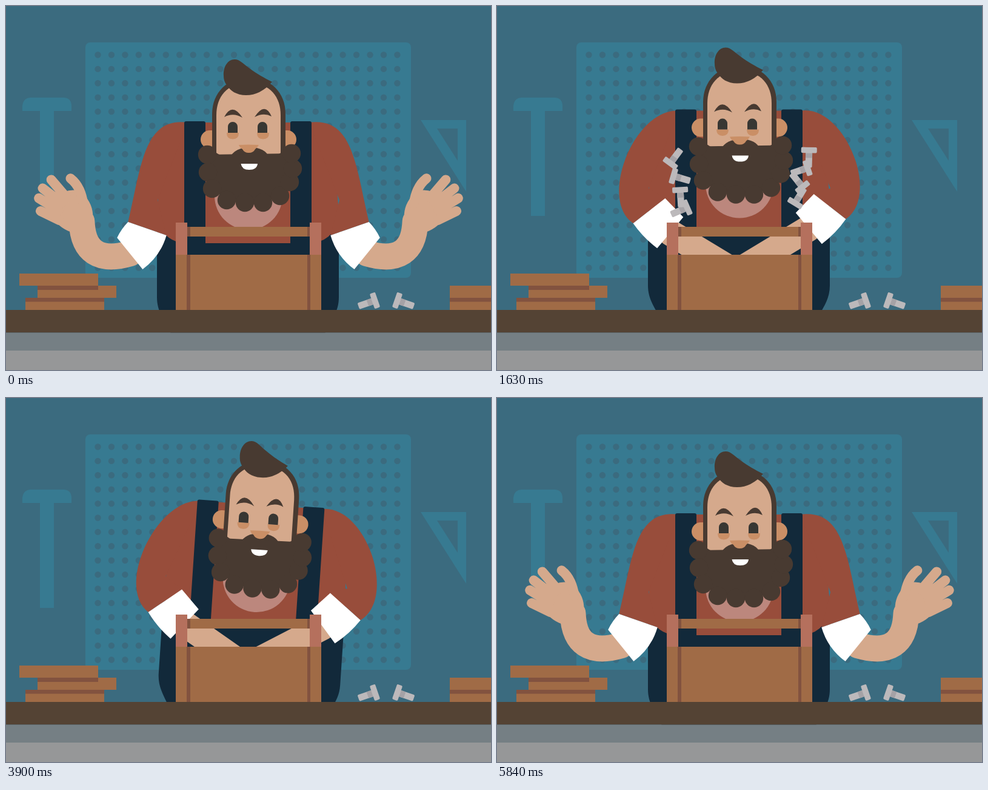
An HTML page that plays this animation: 800x600 px, repeating every 6.47 s.

```html
<!DOCTYPE html>
<html lang="en">
<head>
<meta charset="utf-8">
<title>Toolbox</title>
<style>
html, body { margin: 0; width: 100%; height: 100%; overflow: hidden; background: #3b6b7f; }
svg { display: block; width: 100vw; height: 100vh; }
.board { fill: #377a91; } .wood { fill: #a06b46; } .dark { fill: #82523f; } .post { fill: #b5705d; }
.shirt { fill: #984d3b; } .navy { fill: #12293a; } .hair { fill: #483a31; }
.skin { fill: #d5a98c; } .tan { fill: #ca8f66; } .eye { fill: #383733; }
.limb { fill: none; stroke: #d5a98c; stroke-linecap: round; }
.curls { marker: url(#curl); }
</style>
</head>
<body>
<svg viewBox="0 0 800 600">
  <defs>
    <marker id="curl" markerUnits="userSpaceOnUse" markerWidth="32" markerHeight="32" refX="16" refY="16">
      <circle class="hair" cx="16" cy="16" r="15.200"/>
    </marker>
    <g id="screw">
      <rect x="-24" y="-5.500" width="25" height="11" rx="2" fill="#bcb9bb"/>
      <rect x="-8" y="-5.500" width="8" height="11" fill="#a5a2a6"/>
      <rect y="-13" width="9.500" height="26" rx="2" fill="#bcb9bb"/>
    </g>
    <g id="driver">
      <path fill="#ccd5d8" d="M110-3H166L178-9 190-8 213-3V3L190 8 178 9 166 3H110Z"/>
      <rect x="86" y="-13" width="16" height="26" fill="#9c3f48"/>
      <path fill="#c24f55" d="M8-17Q50-20 88-12V12Q50 20 8 17Q0 16 0 8V-8Q0-16 8-17Z"/>
      <rect x="98" y="-18" width="16" height="36" rx="3" fill="#c24f55"/>
    </g>
    <g id="palm">
      <path class="skin" d="M-31-50Q-34-10-22 4L21 5Q36-12 33-38Q20-58 0-56Z"/>
      <path class="limb" stroke-width="16" d="M-36-60L-25-28M-23-77L-14-40M-7-84L-2-45M13-84L10-45M37-63C39-46 32-32 22-18"/>
    </g>
    <g id="fist">
      <path class="skin" d="M-21 0L-18-25 18-62 42-56 64-30Q62 0 24 4L20 10Z"/>
      <path class="limb" stroke-width="17" d="M-19-27L20-25M-8-39L25-30M3-51L30-35M17-63L35-45"/>
      <use href="#driver" transform="translate(-6 12) rotate(-50.7)"/>
      <path class="limb" stroke-width="18" d="M54-34Q63-18 44-5"/>
    </g>
  </defs>

  <rect width="800" height="600" fill="#3b6b7f"/>
  <rect class="board" x="131" y="60" width="537" height="388" rx="8"/>
  <g id="pegs" stroke="#3b6b7f" stroke-width="10.400" stroke-linecap="round" stroke-dasharray="0 22.45"></g>
  <path class="board" d="M27 173V165Q28 152 40 151H96Q108 152 108 165V173H79V346H56V173Z"/>
  <path class="board" fill-rule="evenodd" d="M684 188H759V306ZM711 202H745V255Z"/>

  <g id="body">
    <path class="navy" d="M249 330H549V480C549 505 536 518 526 540H272C262 518 249 505 249 480Z"/>
    <path class="shirt" d="M249 338L258 235Q266 192 300 192H498Q532 192 540 235L549 338Q547 385 505 391H293Q251 385 249 338Z"/>
    <path id="sleeveL" class="shirt"/>
    <g transform="translate(800) scale(-1 1)"><path id="sleeveR" class="shirt"/></g>
    <circle cx="400" cy="313" r="56" fill="#bc877d"/>
    <rect class="navy" x="294" y="190" width="35" height="206" rx="3"/>
    <rect class="navy" x="469" y="190" width="35" height="206" rx="3"/>
    <g id="head">
      <rect id="earL" class="tan" x="321" y="205" width="36" height="30" rx="15"/>
      <rect id="earR" class="tan" x="443" y="205" width="36" height="30" rx="15"/>
      <path class="hair" d="M340 252V178C340 142 366 118 400 118C436 118 461 142 461 178V252Z"/>
      <path class="skin" d="M347 264V180C347 150 364 127 400 127C436 127 453 150 453 180V264Z"/>
      <path class="hair" d="M359 115C358 100 366 88 377 88C386 88 392 96 402 103C414 112 425 118 439 125Q420 147 396 147C380 147 369 139 366 132C361 128 359 121 359 115Z"/>
      <g id="eyes">
        <path class="tan" d="M364 209H384Q384 219.500 374 219.500Q364 219.500 364 209ZM414 209H434Q434 219.500 424 219.500Q414 219.500 414 209Z"/>
        <path class="eye" d="M366 209V199A8 8 0 0 1 382 199V209ZM415 209V199A8 8 0 0 1 431 199V209Z"/>
      </g>
      <path id="brows" class="hair" d="M360 183Q373 158 390 184Q375 175 360 183ZM410 183Q427 157 438 182Q425 175 410 183Z"/>
      <g id="beard">
        <path class="hair" d="M332 238L344 240Q356 249 369 250Q378 233 402 233Q428 233 434 250Q446 247 455 241L470 238V290H333Z"/>
        <path class="hair curls" d="M332 245L333 274 340 301 364 320 394 324 424 324 452 313 468 290 473 268 471 243"/>
        <path fill="#fff" d="M387.500 260H415Q414 270 401 270Q389 270 387.500 260Z"/>
      </g>
      <path id="nose" class="tan" d="M384 229Q400 228 417 229Q414 234 411 236Q408 242 400.500 242Q393 242 390 236Q386 234 384 229Z"/>
    </g>
    <g id="armL"></g>
    <g transform="translate(800) scale(-1 1)"><g id="armR"></g></g>
  </g>

  <g id="bits"></g>
  <use id="thrown" href="#driver"/>

  <rect class="wood" x="299" y="364" width="202" height="16"/>
  <path class="dark" d="M299 364h5v16h-5ZM497 364h4v16h-4Z"/>
  <path class="post" d="M280 357h19v54h-19ZM501 357h19v54h-19Z"/>
  <rect class="wood" x="280" y="410" width="240" height="92"/>
  <path class="dark" d="M298 410h6v92h-6ZM497 410h5v92h-5Z"/>

  <path class="wood" d="M22 441h130v20h-130ZM52 461h130v20h-130ZM32 481h130v21h-130ZM732 461h68v41h-68Z"/>
  <path class="dark" d="M52 461h100v7h-100ZM32 481h130v6.500h-130ZM732 481h68v6.500h-68Z"/>
  <use href="#screw" transform="translate(604 487) rotate(-19)"/>
  <use href="#screw" transform="translate(650 487) rotate(199)"/>
  <rect y="501" width="800" height="37.500" fill="#544334"/>
  <rect y="538.500" width="800" height="30" fill="#757f84"/>
  <rect y="568" width="800" height="32" fill="#969798"/>
</svg>

<script>
const LOOP = 6470, UP = 580, DIVE = 1340, LAND = 1520, PULL = 4300, TOSS = 5370, END = 5840;
const $ = id => document.getElementById(id);
const set = (id, name, value) => $(id).setAttribute(name, value);
const move = (id, x, y) => set(id, 'transform', `translate(${x} ${y})`);
const show = (id, on) => set(id, 'visibility', on ? 'visible' : 'hidden');

const smooth = p => p * p * (3 - 2 * p);
const back = p => 1 + 2.5 * (p - 1) ** 3 + 1.5 * (p - 1) ** 2;
const spring = p => 1 - Math.cos(2.5 * Math.PI * p) * (1 - p);
const wave = (t, period) => Math.sin(2 * Math.PI * t / period);
const arch = (t, from, to) => t > from && t < to ? Math.sin(Math.PI * (t - from) / (to - from)) : 0;

// Mixes numbers, points and objects of them
function mix(a, b, w) {
  if (typeof a === 'number') return a + (b - a) * w;
  const out = Array.isArray(a) ? [] : {};
  for (const k in a) out[k] = mix(a[k], b[k], w);
  return out;
}

// Keyframes: [time, value, ease into this key]
function key(t, keys) {
  const i = keys.findIndex(k => t < k[0]);
  if (i === 0) return keys[0][1];
  if (i < 0) return keys[keys.length - 1][1];
  const a = keys[i - 1], b = keys[i];
  return mix(a[1], b[1], (b[2] || smooth)((t - a[0]) / (b[0] - a[0])));
}

// Left arm; the right one is its mirror image
const out = { bow: [224, 259], cuff: [233, 367], tilt: 19, bend: 32, elbow: [128, 430], wrist: [125, 355], hand: -45 };
const up = { bow: [234, 238], cuff: [208, 357], tilt: 50, bend: 59, elbow: [115, 331], wrist: [127, 241], hand: 0 };
const dig = { bow: [166, 333], cuff: [251, 353], tilt: -38, bend: -12, elbow: [344, 424], wrist: [400, 458], hand: 140 };
const hold = { bow: [215, 278], cuff: [186, 352], tilt: 36, bend: 50, elbow: [86, 381], wrist: [116, 284], hand: -4 };

const START = [[0, out], [UP, up], [DIVE, up], [LAND, dig]];
const LEFT = [...START, [PULL, dig], [4640, hold, back], [TOSS, hold], [5800, out, back]];
const RIGHT = [...START, [TOSS, dig], [5800, out, back]];
const LIFT = [[0, 0], [640, 11, spring], [DIVE, 11], [2000, 16.5, spring], [TOSS, 16.5], [END, 0, spring]];
const LEAN = [[1900, 0], [2300, 3.8], [TOSS, 3.8], [5640, 0]];
const LOOK = [[DIVE, 0], [1600, 1]];
const TURN = [[4340, 0], [4660, 1, back], [TOSS, 1], [5620, 0]];
const NOD = [[0, 0], [500, -2.5], [DIVE, -2.5], [1600, 0]];

// Both ends of a 67 px edge with the given centre and angle
function edge([x, y], deg) {
  const r = deg * Math.PI / 180, u = 33.5 * Math.cos(r), v = 33.5 * Math.sin(r);
  return [[x - u, y - v], [x + u, y + v]];
}
// Control point bulging sideways from the middle of a line
const bulge = ([x, y], [u, v], k) => [(x + u) / 2 + k * (v - y), (y + v) / 2 - k * (u - x)];

function drawArm(side, t, keys, dx, dy, fist) {
  const p = key(t, keys);
  const shift = ([x, y], sway = 0) => [x + dx + sway, y + dy];
  const sway = -25 * arch(t, 0, UP);
  const cuff = shift(p.cuff), elbow = shift(p.elbow, sway), wrist = shift(p.wrist, sway);
  const dir = (p.tilt + p.bend / 2 + 90) * Math.PI / 180;
  const rim = [cuff[0] + 50 * Math.cos(dir), cuff[1] + 50 * Math.sin(dir)];
  const [a, b] = edge(cuff, p.tilt), [d, c] = edge(rim, p.tilt + p.bend);
  const round = Math.max(0, Math.hypot(c[0] - b[0], c[1] - b[1]) - 43) * 0.0067;

  set('sleeve' + side, 'd', `M300 192C${shift([228, 183])} ${shift(p.bow)} ${a}L${b}L250 320Z`);
  set('cuff' + side, 'd', `M${a}L${b}Q${bulge(b, c, round)} ${c}L${d}Q${bulge(d, a, 0.08)} ${a}Z`);
  set('fore' + side, 'd', `M${rim}Q${elbow} ${wrist}`);
  const shake = t > 640 && t < 1280 ? -3 * wave(t - 640, 320) : 0;
  set('hand' + side, 'href', fist ? '#fist' : '#palm');
  set('hand' + side, 'transform', `translate(${wrist}) rotate(${p.hand + shake})`);
}

// Flight from a point under gravity, s in seconds
const fly = (id, x, y, vx, vy, s, turn) =>
  set(id, 'transform', `translate(${x + vx * s} ${y + vy * s + 1200 * s * s}) rotate(${turn})`);

const BITS = 8;
function drawBits(t) {
  const late = t > 4000, s = (t - (late ? 4480 : 1500)) / 1000;
  for (let i = 0; i < BITS; i++) {
    const side = (i % 2 ? 1 : -1) * (late ? -1 : 1);
    show('bit' + i, s > 0 && s < 0.9);
    fly('bit' + i, 400, 400, side * (693 + 26 * i), -661 - 100 * i, s, 140 + 145 * i + 400 * (s - 0.54));
  }
}

function drawThrown(t) {
  const s = (t - 5400) / 1000;
  show('thrown', s >= 0 && s < 0.42);
  fly('thrown', 127, 262, 2300, -900, s, 700 * s - 50.7);
}

function draw(t) {
  const look = key(t, LOOK), turn = key(t, TURN);
  set('body', 'transform', `rotate(${key(t, LEAN)} 399 501) translate(0 ${-key(t, LIFT)})`);
  set('head', 'transform', `translate(0 ${key(t, NOD)}) rotate(${9 * turn} 399 306)`);
  move('eyes', -2 * look * (t < TOSS) - 12 * turn, 14 * look - 8 * turn);
  move('brows', -2 * look * (t < TOSS) - 14 * turn, 11 * look - 8 * turn);
  move('nose', -15 * turn, 6 * look - 5 * turn);
  move('beard', -8 * turn, 6 * look - 7 * turn);
  move('earL', 4 * turn, 0);
  set('earR', 'rx', Math.max(1, 15 - 14 * turn));

  const stir = key(t, [[2200, 0], [2700, 1], [4000, 1], [PULL, 0]]);
  const bob = 5 * stir * (1 + arch(t, 2700, 3900)) * wave(t - 2740, 550);
  const low = end => key(t, [[DIVE, 0], [LAND, 1], [end, 1], [end + 200, 0]]);
  drawArm('L', t, LEFT, bob / 2 - stir, 4 * low(PULL) + bob, t >= PULL && t < 5400);
  drawArm('R', t, RIGHT, 0, -3 * low(TOSS), false);
  drawBits(t);
  drawThrown(t);
}

const repeat = (n, part) => Array.from({ length: n }, (_, i) => part(i)).join('');
$('pegs').innerHTML = repeat(16, i => `<path d="M151.5 ${80.5 + 23.4 * i}h494"/>`);
$('bits').innerHTML = repeat(BITS, i => `<use id="bit${i}" href="#screw"/>`);
for (const s of 'LR') $('arm' + s).innerHTML =
  `<path id="fore${s}" class="limb" stroke-width="43"/><path id="cuff${s}" fill="#fff"/><use id="hand${s}"/>`;

const begin = performance.now();
function frame() {
  draw((performance.now() - begin) % LOOP);
  requestAnimationFrame(frame);
}
draw(0);
requestAnimationFrame(frame);
</script>
</body>
</html>
```
